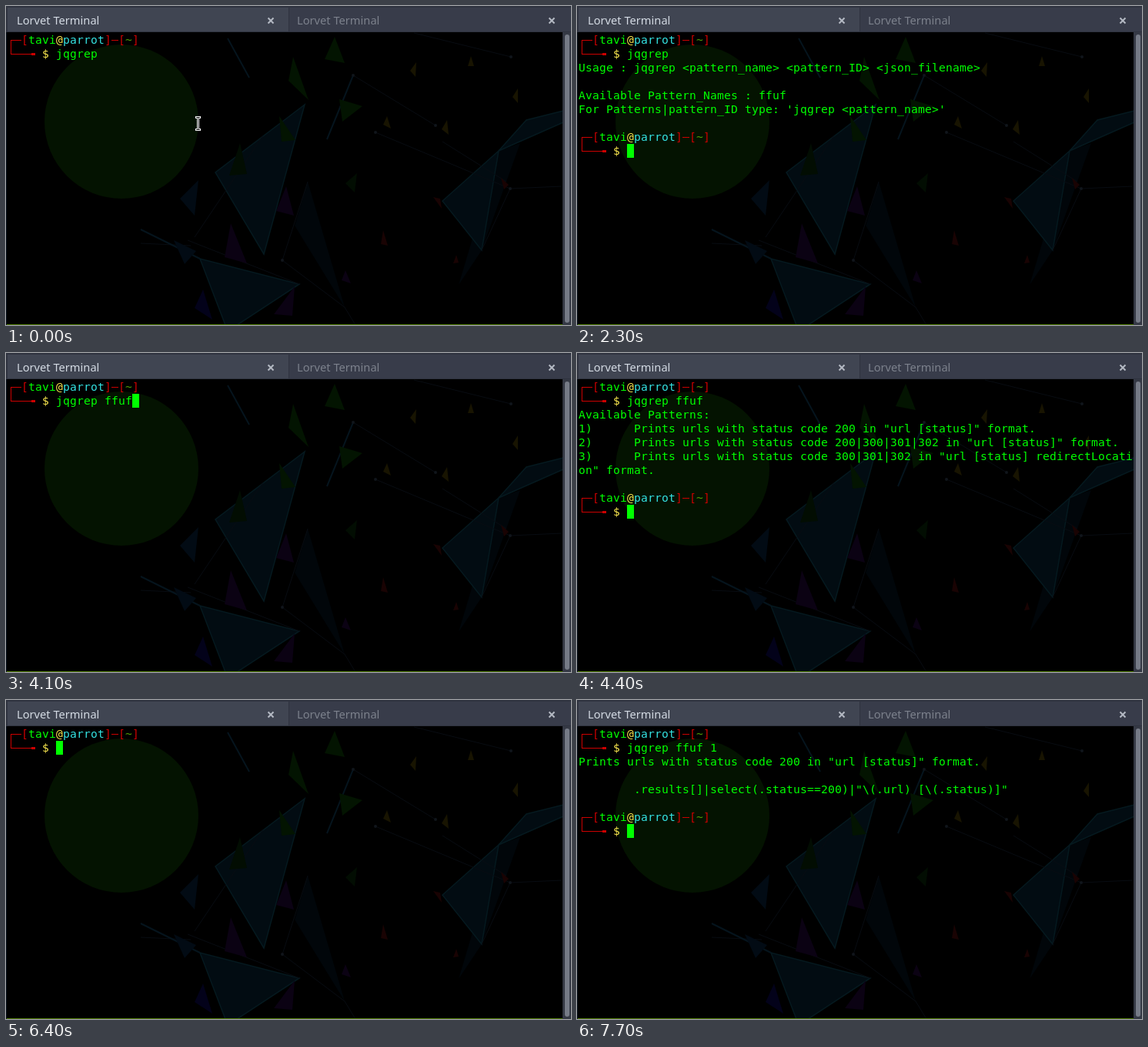
Recreate the animation shown at these times as an HTML page. Size 734 by 414 pixels, loop 8 s.

```html
<!DOCTYPE html>
<html lang="en">
<head>
<meta charset="utf-8">
<title>Terminal</title>
<style>
  html, body { margin: 0; width: 100%; height: 100%; overflow: hidden; background: #000; }
  #stage { position: relative; width: 734px; height: 414px; overflow: hidden; background: #000; }
  #stage > svg { position: absolute; left: 0; top: 0; }
  .tab {
    position: absolute; top: 2px; height: 31px; box-sizing: border-box;
    font: 14.67px/33px "Noto Sans", sans-serif; white-space: pre;
  }
  .on { left: 2px; width: 365px; padding-left: 12px; background: #404552; color: #d3dae3; }
  .off { left: 368px; width: 366px; padding-left: 10px; background: #383c4a; color: #7c818c; }
  #bar { position: absolute; left: 0; top: 0; width: 734px; height: 34px; background: #2f333f; }
  #trough { position: absolute; left: 723px; top: 34px; width: 11px; height: 380px; background: #353945; }
  #thumb { position: absolute; left: 3px; top: 3px; width: 6px; height: 374px; border-radius: 3px; background: #767b87; }
  .edge { position: absolute; }
  #term { position: absolute; left: 2px; top: 35px; color: #0f0; font: 14.667px/18px "DejaVu Sans Mono", monospace; }
  .row { position: absolute; left: 0; height: 18px; white-space: pre; }
  #term svg { position: absolute; left: 0; overflow: visible; }
  .cursor { position: absolute; width: 9px; height: 18px; background: #0f0; }
  .r { color: #c00; }
  .y { color: #fce94f; }
  .c { color: #34e2e2; }
  .g { color: #4e9a06; }
</style>
</head>
<body>
<div id="stage">
  <svg id="wall" width="734" height="414">
    <circle cx="150" cy="150" r="100" fill="#041301"/>
    <g fill="#01060a">
      <path d="M392 228L375 285L440 391Z"/>
      <path d="M640 188L668 178L618 317L588 362Z"/>
    </g>
    <g fill="#020c12" stroke="#05191f" stroke-width="1.5">
      <path d="M388 128L272 216L335 322Z"/>
      <path d="M640 188L567 253L618 317Z"/>
      <path d="M252 328L381 361L288 422Z"/>
      <path d="M640 188L676 148L724 136V151Z"/>
    </g>
    <g fill="none" stroke="#080c12">
      <path d="M451 90L558 155M480 164L655 237L722 234M567 176L650 228"/>
      <path d="M392 228L359 330L440 391L454 414M236 304L381 361"/>
      <path d="M530 35L656 66M334 168L245 300M175 308L240 311M655 237L618 317"/>
    </g>
    <path d="M288 42L316 93M451 90L417 173M175 290L252 328" fill="none" stroke="#05141d" stroke-width="2"/>
    <g fill="#10151b">
      <circle cx="451" cy="90" r="2"/><circle cx="480" cy="164" r="2"/>
      <circle cx="558" cy="155" r="2"/><circle cx="656" cy="66" r="2"/>
      <circle cx="655" cy="237" r="2"/><circle cx="359" cy="330" r="2"/>
    </g>
  </svg>
  <div id="term"></div>
  <svg id="pointer" width="8" height="19">
    <path d="M0 1.5H7M0 17.5H7M3.5 1V18" fill="none" stroke="#fff" stroke-width="3"/>
    <path d="M1 1.5H6M1 17.5H6M3.5 2V17" fill="none" stroke="#222"/>
  </svg>
  <div id="bar">
    <div class="tab on">Lorvet Terminal</div>
    <div class="tab off">Lorvet Terminal</div>
  </div>
  <svg width="734" height="34" fill="none" stroke="#b4b9c3" stroke-width="2">
    <path d="M340.5 15.5l7 7m0-7l-7 7M705.5 15.5l7 7m0-7l-7 7"/>
  </svg>
  <div class="edge" style="left:0;top:34px;width:1px;height:380px;background:#0c1420"></div>
  <div class="edge" style="left:1px;top:413px;width:722px;height:1px;background:#4e7a06"></div>
  <div id="trough"><div id="thumb"></div></div>
</div>
<script>
const LOOP = 8000, CW = 9, LH = 18;
const $ = id => document.getElementById(id);
const term = $("term"), pointer = $("pointer");

// Small triangles of the wallpaper, grouped by colour
const shards = {
  "#031401": "M373 66L367 97L393 122ZM427 40L414 69L440 74ZM433 121L463 130L437 150ZM355 143L376 174L358 176Z",
  "#020d02": "M304 178L290 220L313 218ZM456 217L441 230L453 242Z",
  "#181401": "M533 73L525 84L532 92ZM604 65L600 78L608 78ZM665 107L658 118L665 126ZM495 143L490 154L500 159ZM573 148L566 160L575 167Z",
  "#190303": "M490 291L487 309L496 311ZM555 248L564 250L566 263ZM643 223L653 232L647 238ZM585 323L581 334L588 333Z",
  "#0b0213": "M364 234L351 266L374 272ZM292 282L284 326L313 334ZM375 364L348 400L372 402ZM441 343L436 356L448 360Z",
  "#020b14": "M250 226L226 250L245 272ZM218 304L247 318L232 335Z",
  "#03021a": "M256 368L245 392L268 407Z"
};
for (const [fill, d] of Object.entries(shards)) {
  const p = document.createElementNS("http://www.w3.org/2000/svg", "path");
  p.setAttribute("d", d);
  p.setAttribute("fill", fill);
  $("wall").append(p);
}

const usage = [
  "Usage : jqgrep <pattern_name> <pattern_ID> <json_filename>",
  "",
  "Available Pattern_Names : ffuf",
  "For Patterns|pattern_ID type: 'jqgrep <pattern_name>'",
  ""
];
const patterns = [
  "Available Patterns:",
  '1)      Prints urls with status code 200 in "url [status]" format.',
  '2)      Prints urls with status code 200|300|301|302 in "url [status]" format.',
  '3)      Prints urls with status code 300|301|302 in "url [status] redirectLocati',
  'on" format.',
  ""
];
const filter = [
  'Prints urls with status code 200 in "url [status]" format.',
  "",
  '        .results[]|select(.status==200)|"\\(.url) [\\(.status)]"',
  ""
];

// [time, command, output, next command or null, cursor shown]
const steps = [
  [0, "jqgrep", [], null, false],
  [200, "jqgrep", [], null, true],
  [900, "jqgrep", [], null, false],
  [1100, "jqgrep", usage, null, false],
  [1200, "jqgrep", usage, "", true],
  [1800, "jqgrep", usage, "", false],
  [2300, "jqgrep", usage, "", true],
  [3500, "jqgrep ", [], null, true],
  [3700, "jqgrep f", [], null, true],
  [3900, "jqgrep ff", [], null, true],
  [4000, "jqgrep ffu", [], null, true],
  [4100, "jqgrep ffuf", [], null, true],
  [4400, "jqgrep ffuf", patterns, "", true],
  [5000, "jqgrep ffuf", patterns, "", false],
  [5600, "jqgrep ffuf", patterns, "", true],
  [6200, "jqgrep ffuf", patterns, "cle", true],
  [6300, "jqgrep ffuf", patterns, "clear", true],
  [6400, "", [], null, true],
  [6900, "jqgrep ffuf", [], null, true],
  [7300, "jqgrep ffuf ", [], null, true],
  [7400, "jqgrep ffuf 1", [], null, true],
  [7700, "jqgrep ffuf 1", filter, "", true]
];
// [time, x, y], hidden when x is null
const moves = [[0, 246, 143], [500, 399, 160], [600, 552, 177], [1100, null, 0]];

const esc = s => s.replace(/&/g, "&amp;").replace(/</g, "&lt;");
const tint = (cls, s) => `<span class="${cls}">${s}</span>`;
const row = (n, html) => `<div class="row" style="top:${n * LH}px">${html}</div>`;

function prompt(n, cmd) {
  const head = "  " + tint("r", "[") + "tavi" + tint("y", "@") + tint("c", "parrot") +
    tint("r", "] [") + tint("g", "~") + tint("r", "]");
  const lines = `<svg width="150" height="36" style="top:${n * LH}px" fill="#c00" shape-rendering="crispEdges">` +
    '<path d="M4 9h14v1H5v17h31v1H4zM31 26h5v3h-5zM135 9h9v1h-9z"/></svg>';
  return lines + row(n, head) + row(n + 1, "     " + tint("y", "$") + " " + esc(cmd));
}

function draw([, cmd, out, next, cursor]) {
  let html = prompt(0, cmd) + out.map((s, i) => row(i + 2, esc(s))).join("");
  let line = 1, typed = cmd;
  if (next !== null) {
    html += prompt(out.length + 2, next);
    line = out.length + 3;
    typed = next;
  }
  if (cursor) {
    html += `<div class="cursor" style="left:${(7 + typed.length) * CW}px;top:${line * LH}px"></div>`;
  }
  term.innerHTML = html;
}

// Snap the glyph advance to the terminal's cell width
function fitCells() {
  const probe = document.createElement("span");
  probe.textContent = "m".repeat(80);
  probe.style.position = "absolute";
  term.append(probe);
  term.style.letterSpacing = CW - probe.getBoundingClientRect().width / 80 + "px";
  probe.remove();
}

const at = (list, t) => list.findLast(s => s[0] <= t);
let shown;

function tick() {
  const t = performance.now() % LOOP;
  const step = at(steps, t);
  if (step !== shown) draw(shown = step);
  const [, x, y] = at(moves, t);
  pointer.style.display = x === null ? "none" : "";
  pointer.style.transform = `translate(${x || 0}px, ${y}px)`;
  requestAnimationFrame(tick);
}

fitCells();
tick();
</script>
</body>
</html>
```
